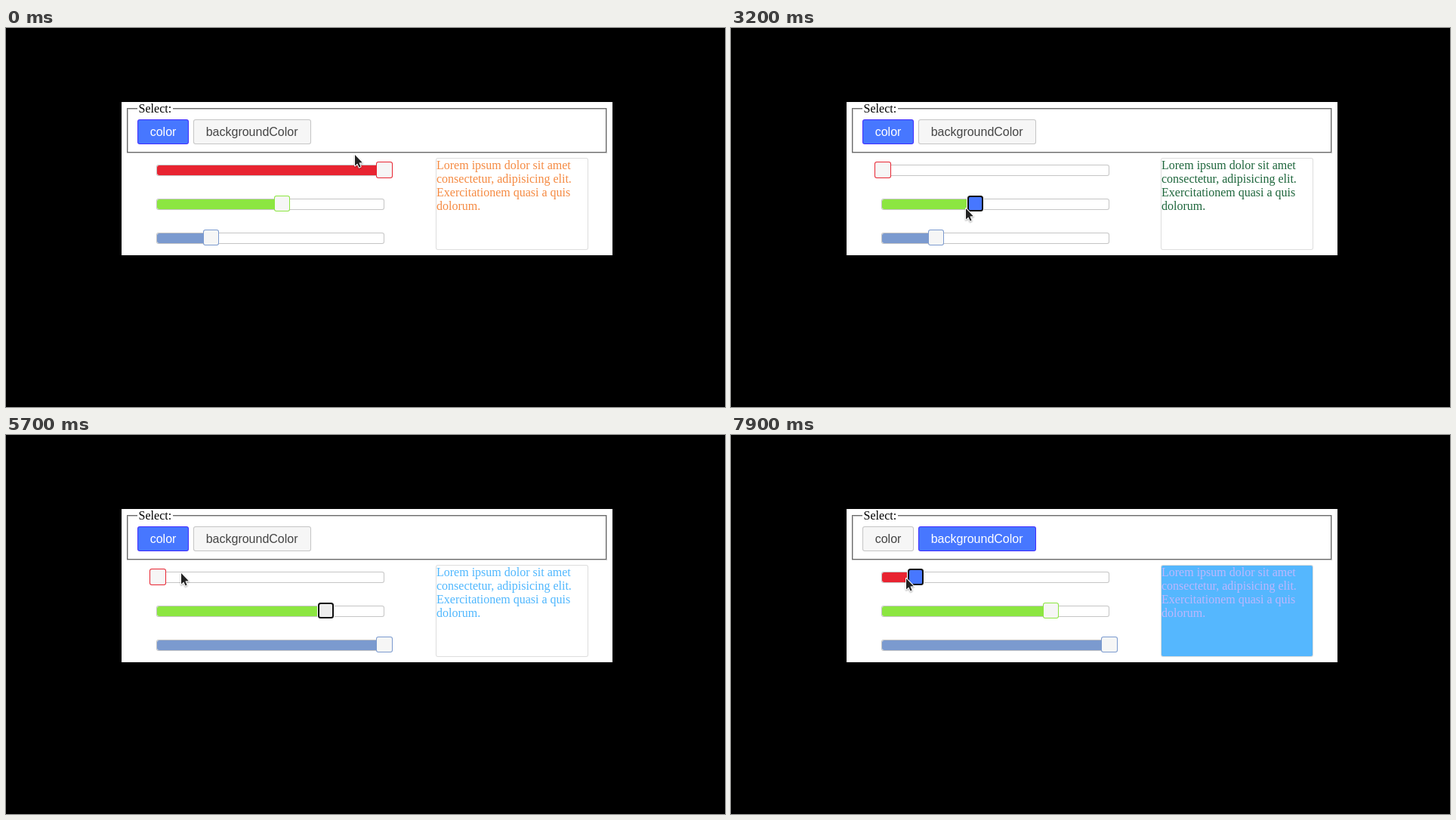
An HTML page with a canvas that plays this animation: 952x502 px, repeating every 8000 ms.

```html
<!DOCTYPE html>
<html lang="en">
<head>
<meta charset="utf-8">
<title>Colour sliders</title>
<style>
html, body { margin: 0; width: 100%; height: 100%; overflow: hidden; background: #000; }
canvas { display: block; }
</style>
</head>
<body>
<canvas id="stage" width="952" height="502"></canvas>
<script>
const ctx = document.getElementById('stage').getContext('2d');
const LOOP = 8000, STEP = 100;
const SERIF = '16px "Liberation Serif", "Times New Roman", serif';
const SANS = '16px "Liberation Sans", Arial, sans-serif';
const BLUE = '#4777ff', BLUE_EDGE = '#402bff';
const RED = 0, GREEN = 1, NAVY = 2;
const TRACK = 300, LAG = 22, HOLD = 120;
const SWITCH = 6900;

const sliders = [
  { color: '#e82431', start: 255 },
  { color: '#8ce641', start: 140 },
  { color: '#7b9acf', start: 60 }
];
const lorem = ['Lorem ipsum dolor sit amet', 'consectetur, adipisicing elit.',
  'Exercitationem quasi a quis', 'dolorum.'];

// The pointer glides from stop to stop; a drag also carries a slider along.
const moves = [];
let here = { x: 462, y: 168 };
function move(start, end, x, y, slider = -1) {
  moves.push({ start, end, from: here, to: { x, y }, slider });
  here = { x, y };
}
move(0, 400, 499, 196);
move(800, 1450, 255, 180, RED);
move(1450, 1990, 315, 198, RED);
move(1990, 2360, 193, 216, RED);
move(2360, 2400, 244, 218);
move(2500, 2800, 368, 238);
move(3050, 3500, 150, 242, GREEN);
move(3550, 3890, 271, 282);
move(3890, 4150, 538, 278, NAVY);
move(4400, 4750, 150, 236);
move(4750, 4880, 203, 237);
move(4880, 5400, 425, 234, GREEN);
move(5450, 5760, 211, 177);
move(5950, 6400, 429, 193, RED);
move(6430, 6700, 345, 139);
move(6950, 7400, 420, 192);
move(7550, 8050, 180, 189, RED);

const clamp = (v, lo, hi) => Math.min(hi, Math.max(lo, v));

function along(m, t) {
  const u = clamp((t - m.start) / (m.end - m.start), 0, 1);
  const k = u * u * (3 - 2 * u);
  return { x: m.from.x + (m.to.x - m.from.x) * k, y: m.from.y + (m.to.y - m.from.y) * k };
}

// Handles trail the pointer by LAG
function levels(t) {
  const rgb = sliders.map(s => s.start);
  for (const m of moves) {
    if (m.slider < 0 || m.start >= t) continue;
    const dx = along(m, t - LAG).x - m.from.x;
    rgb[m.slider] = clamp(rgb[m.slider] + dx * 255 / TRACK, 0, 255);
  }
  return rgb.map(Math.round);
}

// Display colour profile, applied in linear light
function shown(rgb) {
  const [r, g, b] = rgb.map(v => (v / 255) ** 2.2);
  const out = [0.9 * r + 0.05 * g + 0.05 * b, 0.97 * g - 0.02 * b, 0.01 * r + 0.99 * b];
  return `rgb(${out.map(c => Math.round(255 * Math.max(0, c) ** (1 / 2.2)))})`;
}

function rect(x, y, w, h, color) {
  ctx.fillStyle = color;
  ctx.fillRect(x, y, w, h);
}

function round(x, y, w, h, r, color) {
  ctx.fillStyle = color;
  ctx.beginPath();
  ctx.roundRect(x, y, w, h, r);
  ctx.fill();
}

function box(x, y, w, h, edge, fill) {
  round(x, y, w, h, 3, edge);
  round(x + 1, y + 1, w - 2, h - 2, 2, fill);
}

function label(str, x, y, font, color) {
  ctx.font = font;
  ctx.fillStyle = color;
  ctx.fillText(str, x, y);
}

const inside = (p, x, y, w, h) => p.x >= x && p.x < x + w && p.y >= y && p.y < y + h;

function fieldset() {
  const dark = '#6c6c6c', light = '#c0c0c0';
  rect(160, 106, 636, 60, light);
  rect(160, 106, 635, 59, dark);
  rect(161, 107, 634, 58, dark);
  rect(161, 107, 633, 57, light);
  rect(162, 108, 632, 56, '#fff');
  rect(174, 98, 47, 18, '#fff');
  label('Select:', 175.6, 112, SERIF, '#000');
}

function button(str, x, w, on, hover, focus) {
  const y = 121, h = 33;
  if (focus) {
    ctx.save();
    ctx.shadowColor = 'rgb(94,158,214)';
    ctx.shadowBlur = 3;
    round(x - 1, y - 1, w + 2, h + 2, 4, 'rgb(94,158,214)');
    ctx.restore();
  }
  box(x, y, w, h, on ? BLUE_EDGE : hover ? '#ccc' : '#c5c5c5',
    on ? BLUE : hover ? '#ededed' : '#f6f6f6');
  label(str, x + 16.7, 143, SANS, on ? '#fff' : hover ? '#2b2b2b' : '#454545');
}

function slider(i, value, mouse, focus, pressed) {
  const color = sliders[i].color;
  const top = 181.2 + 44.8 * i;
  const y = Math.round(top), h = Math.round(top + 14.8) - y;
  const span = TRACK * value / 255;
  box(199, y, TRACK + 2, h, '#c5c5c5', '#fff');
  if (span > 0) round(200, y + 1, span, h - 2, Math.min(3, span / 2), color);

  const left = 190.4 + span;
  const hx = Math.round(left), hy = Math.round(top - 3.8);
  const hw = Math.round(left + 21.2) - hx, hh = Math.round(top + 17.4) - hy;
  const face = pressed ? BLUE
    : focus || inside(mouse, hx, hy, hw, hh) ? '#ededed' : '#f6f6f6';
  if (focus) {
    round(hx - 1, hy - 1, hw + 2, hh + 2, 4, '#fff');
    round(hx, hy, hw, hh, 3.5, '#101010');
    round(hx + 2, hy + 2, hw - 4, hh - 4, 1.5, face);
  } else {
    box(hx, hy, hw, hh, color, face);
  }
}

function preview(color, fill) {
  box(569, 172, 202, 122, '#ddd', fill);
  lorem.forEach((line, i) => label(line, 570, 187 + 18 * i, SERIF, color));
}

const arrowShape = new Path2D('M0 0V14.5L3.3 11.6L5.6 16.6L7.6 15.7L5.4 10.6L9.8 10.2Z');
const handShape = new Path2D('M4.5 11V2.5Q4.5 1 6 1Q7.5 1 7.5 2.5V7L14 8.5Q16.5 9 16.3 11' +
  'L15 17.5H6.5L1 11.5Q.5 9.5 2.5 10ZM10.4 8V10M13.2 8.6V10.4');

function cursor(x, y, hand) {
  ctx.save();
  ctx.lineJoin = 'round';
  if (hand) {
    ctx.translate(x - 8, y - 1);
    ctx.fillStyle = '#fff';
    ctx.strokeStyle = '#1a1a1a';
    ctx.lineWidth = 1.3;
    ctx.fill(handShape);
    ctx.stroke(handShape);
  } else {
    ctx.translate(x, y);
    ctx.save();
    ctx.shadowColor = 'rgba(0,0,0,.35)';
    ctx.shadowBlur = 2;
    ctx.shadowOffsetY = 1;
    ctx.strokeStyle = '#fff';
    ctx.lineWidth = 2;
    ctx.stroke(arrowShape);
    ctx.restore();
    ctx.fillStyle = '#222';
    ctx.fill(arrowShape);
  }
  ctx.restore();
}

function draw(t) {
  const begun = moves.filter(m => m.start < t);
  const last = begun[begun.length - 1] || moves[0];
  const drag = begun.filter(m => m.slider >= 0).pop();
  const pressed = last === drag && t < last.end + HOLD;
  const spot = along(last, t);
  const mouse = { x: Math.round(spot.x), y: Math.round(spot.y) };

  const back = t >= SWITCH;
  const filling = back && drag.start > SWITCH;
  const owner = drag && (!back || filling) ? drag.slider : -1;
  const rgb = levels(t);
  const overColor = inside(mouse, 174, 121, 68, 33);
  const overBack = inside(mouse, 248, 121, 156, 33);

  rect(0, 0, 952, 502, '#000');
  rect(153, 98, 650, 203, '#fff');
  fieldset();
  button('color', 174, 68, !back, overColor, false);
  button('backgroundColor', 248, 156, back, overBack, back && !filling);
  rgb.forEach((v, i) => slider(i, v, mouse, owner === i, owner === i && pressed));
  preview(shown(levels(Math.min(t, SWITCH))), filling ? shown(rgb) : '#fff');
  cursor(mouse.x, mouse.y, overColor || overBack);
}

function tick() {
  draw(Math.floor(performance.now() % LOOP / STEP) * STEP);
  requestAnimationFrame(tick);
}
tick();
</script>
</body>
</html>
```
